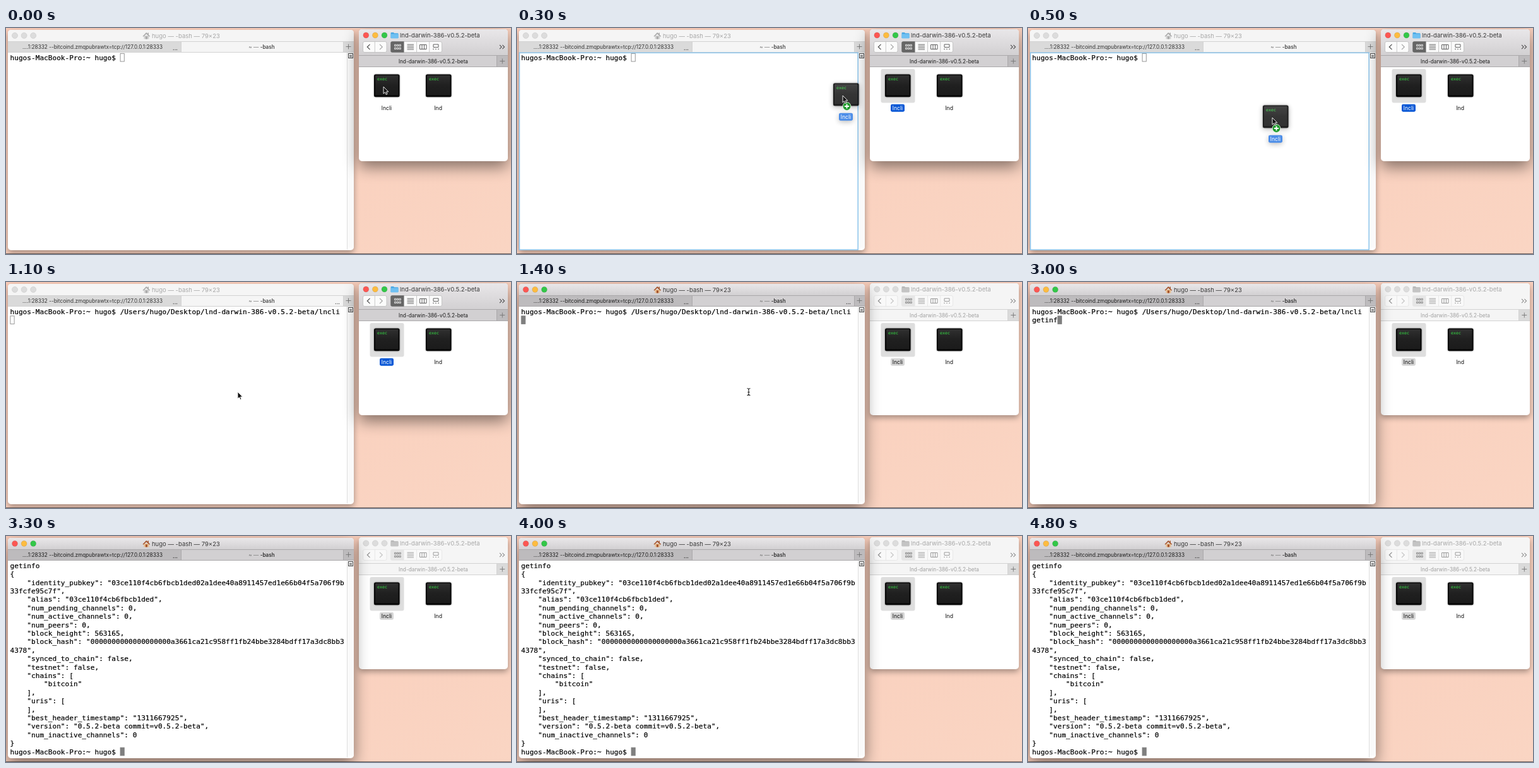
Recreate the animation shown at these times as an HTML page. Size 800 by 358 pixels, loop 5000 ms.

```html
<!DOCTYPE html>
<html lang="en">
<head>
<meta charset="utf-8">
<title>Terminal drag and drop</title>
<style>
html, body { margin: 0; width: 100%; height: 100%; overflow: hidden; background: #f9d0bd; }
svg { display: block; width: 800px; height: 358px; }
text { font-family: Inter, sans-serif; font-size: 8.25px; fill: var(--ink); white-space: pre; }
.win {
  --ink: #333; --title: #a8a8a8; --bar: #f5f5f5; --tab: #dadada; --line: #d2d2d2;
  --r: #dcdcdc; --y: #dcdcdc; --g: #dcdcdc; --ring: #cdcdcd;
  --roof: #a9a9a9; --wall: #d0d0d0; --folder: #c4c4c4; --folder2: #b8b8b8;
  --btn: #f9f9f9; --edge: #e4e4e4; --icon: #909090; --sel: #e6e6e6; --selIcon: #777;
  --pick: #d6d6d6; --pickInk: #111;
}
.win.on {
  --ink: #1c1c1c; --title: #383838; --bar: #d2d0d2; --tab: #bdbbbd; --line: #aaa8aa;
  --r: #fc5753; --y: #fdbc40; --g: #33c748; --ring: rgba(0,0,0,.14);
  --roof: #a5532b; --wall: #e5b98a; --folder: #6fc0f2; --folder2: #4ba8e4;
  --btn: #fbfbfb; --edge: #bcbcbc; --icon: #505050; --sel: #666; --selIcon: #fff;
  --pick: #0b59d6; --pickInk: #fff;
}
.frame { fill: #fff; filter: drop-shadow(0 4px 5px rgba(0,0,0,.34)); }
.on .frame { filter: drop-shadow(0 9px 12px rgba(0,0,0,.48)); }
.shade { fill: var(--bar); }
.on .shade { fill: url(#metal); }
.title { font-size: 9.5px; fill: var(--title); }
.mid { text-anchor: middle; }
.dim { fill: #777; font-weight: 400; }
#finder:not(.on) .tabname { fill: #a0a0a0; }
.name { font-size: 8.7px; fill: #111; text-anchor: middle; }
.picked { fill: var(--pickInk); }
.line { stroke: var(--line); fill: none; }
.glyph { stroke: var(--icon); fill: none; }
.btn { fill: var(--btn); stroke: var(--edge); }
#rows text, .exec { font-family: "DejaVu Sans Mono", monospace; }
#rows text { font-size: 11.13px; fill: #000; stroke: #000; stroke-width: .2; }
.exec { font-size: 6.6px; fill: #35e044; }
</style>
</head>
<body>
<svg viewBox="0 0 800 358">
  <defs>
    <linearGradient id="wall" x2="1" y2="1">
      <stop stop-color="#f9cbb8"/><stop offset="1" stop-color="#fad5c3"/>
    </linearGradient>
    <linearGradient id="metal" x2="0" y2="1">
      <stop stop-color="#e9e7e9"/><stop offset="1" stop-color="#d2d0d2"/>
    </linearGradient>
    <linearGradient id="screen" x2="0" y2="1">
      <stop stop-color="#303030"/><stop offset=".5" stop-color="#202020"/><stop offset="1" stop-color="#1b1b1b"/>
    </linearGradient>
    <g id="lights" stroke="var(--ring)" stroke-width=".7">
      <circle r="4.5" fill="var(--r)"/>
      <circle cx="14.6" r="4.5" fill="var(--y)"/>
      <circle cx="29.2" r="4.5" fill="var(--g)"/>
    </g>
    <g id="app">
      <rect x="583" y="73.5" width="40.5" height="35.7" rx="2.5" fill="#060606" style="filter:drop-shadow(0 .8px .8px rgba(0,0,0,.5))"/>
      <rect x="585" y="75" width="36.5" height="31.5" rx="1" fill="url(#screen)"/>
      <text class="exec" x="588" y="82.8">exec</text>
    </g>
    <path id="plus" d="M-4 0H4M0 -4V4" fill="none" stroke="#757575" stroke-width=".9"/>
  </defs>

  <rect width="800" height="358" fill="url(#wall)"/>
  <rect y="357" width="800" height="1" fill="#71625d"/>

  <g id="windows">
  <g id="term" class="win">
    <rect class="frame" x="3" y="3" width="548" height="349" rx="5"/>
    <path class="shade" d="M3 21V8Q3 3 8 3H546Q551 3 551 8V21Z"/>
    <path d="M3 21H277V38H3ZM534 21H551V38H534Z" fill="var(--tab)"/>
    <path d="M277 21H534V38H277Z" fill="var(--bar)"/>
    <path class="line" d="M3 21.5H551M3 38.5H551M277.5 21V38M534.5 21V38"/>
    <use href="#lights" x="14" y="12"/>
    <path d="M218.5 12H226.5V17.5H218.5Z" fill="var(--wall)"/>
    <path d="M216.5 13L222.3 7L224.5 9.2V7.6H226V10.7L228.3 13L227.2 13.8L222.3 9.4L217.5 13.8ZM221 13.5H224V17.5H221Z" fill="var(--roof)"/>
    <text class="title" x="231" y="15.6">hugo — -bash — 79×23</text>
    <text class="mid" x="137" y="33">....1:28332 --bitcoind.zmqpubrawtx=tcp://127.0.0.1:28333</text>
    <text class="mid" x="405" y="33" font-weight="500"><tspan class="dim">~ — </tspan>-bash</text>
    <text x="264" y="35" font-weight="600">...</text>
    <text id="busy" x="521" y="35" font-weight="600">...</text>
    <use href="#plus" x="542.5" y="29.5"/>
    <rect x="540" y="39" width="11" height="309" fill="#fafafa"/>
    <path d="M540.5 39V351" stroke="#dedede"/>
    <rect x="542.5" y="40.5" width="7" height="7" fill="#fff" stroke="#444"/>
    <path d="M544 43.5H548M544 45.5H548" stroke="#444"/>
    <g id="rows"></g>
    <rect id="caret" width="6.2" height="12.6" stroke-width=".9"/>
    <rect id="drop" x="3.8" y="39.3" width="536.4" height="312" fill="none" stroke="#92c7ec" stroke-width="1.6"/>
  </g>

  <g id="finder" class="win">
    <rect class="frame" x="559" y="2" width="236" height="209" rx="5"/>
    <path class="shade" d="M559 43V7Q559 2 564 2H790Q795 2 795 7V43Z"/>
    <path d="M559 43H777V61H559Z" fill="var(--bar)"/>
    <path d="M777 43H795V61H777Z" fill="var(--tab)"/>
    <path class="line" d="M559 43.5H795M559 61.5H795M777.5 44V61"/>
    <use href="#lights" x="570.3" y="11.5"/>
    <path d="M609.5 8Q609.5 7 610.5 7H614L615 8.3H620.5Q621.5 8.3 621.5 9.3V16H609.5Z" fill="var(--folder2)"/>
    <rect x="609.5" y="9.4" width="12" height="7" rx=".8" fill="var(--folder)"/>
    <text class="title" x="624" y="15">lnd-darwin-386-v0.5.2-beta</text>
    <rect class="btn" x="565.5" y="21.5" width="37.5" height="17" rx="2.5" stroke-width=".8"/>
    <path d="M584.3 21.5V38.5" stroke="var(--edge)" stroke-width=".8"/>
    <path class="glyph" d="M576.5 25.8L572.3 30L576.5 34.2" stroke-width="1.2"/>
    <path class="glyph" d="M592 25.8L596.2 30L592 34.2" stroke-width="1.2" opacity=".5"/>
    <rect class="btn" x="609.5" y="21.5" width="81" height="17" rx="2.5" stroke-width=".8"/>
    <path d="M650.5 21.5V38.5M670.7 21.5V38.5" stroke="var(--edge)" stroke-width=".8"/>
    <path d="M630.5 21.2H612Q609.3 21.2 609.3 24V36Q609.3 38.8 612 38.8H630.5Z" fill="var(--sel)"/>
    <path d="M615.5 26.3h2.4v2.4h-2.4zM619.2 26.3h2.4v2.4h-2.4zM622.9 26.3h2.4v2.4h-2.4zM615.5 31.2h2.4v2.4h-2.4zM619.2 31.2h2.4v2.4h-2.4zM622.9 31.2h2.4v2.4h-2.4z" fill="none" stroke="var(--selIcon)" stroke-width=".8"/>
    <path class="glyph" d="M635.5 26.2H646M635.5 28.8H646M635.5 31.4H646M635.5 34H646" stroke-width=".9"/>
    <path class="glyph" d="M655.5 26.5H666V33.5H655.5ZM659 26.5V33.5M662.5 26.5V33.5" stroke-width=".9"/>
    <path class="glyph" d="M677 26H685V30.5H677ZM676 33.3H678M680 33.3H682M684 33.3H686" stroke-width=".9"/>
    <path class="glyph" d="M782 26.8L785.2 30L782 33.2M786.4 26.8L789.6 30L786.4 33.2" stroke-width="1.1"/>
    <text class="mid tabname" x="677" y="56">lnd-darwin-386-v0.5.2-beta</text>
    <use href="#plus" x="786.3" y="52.5"/>
    <g id="pick">
      <rect x="576.5" y="65" width="54" height="53.5" rx="3" fill="#dedede"/>
      <rect x="592" y="120.7" width="22" height="12" rx="2.4" fill="var(--pick)"/>
    </g>
    <use href="#app"/>
    <use href="#app" x="82"/>
    <text id="cliName" class="name" x="603" y="129.8">lncli</text>
    <text class="name" x="684.7" y="129.8">lnd</text>
  </g>
  </g>

  <g id="ghost">
    <g opacity=".9" style="filter:drop-shadow(0 2px 4px rgba(0,0,0,.3))">
      <use href="#app"/>
      <rect x="592" y="120.7" width="22" height="12" rx="2.4" fill="#3a82e6"/>
      <text class="name" x="603" y="129.8" style="fill:#fff">lncli</text>
    </g>
    <g id="badge" transform="translate(604.5 110)">
      <circle r="6.4" fill="#1f9a2c" stroke="#e4f3e4" stroke-width=".9"/>
      <path d="M-3.6 0H3.6M0 -3.6V3.6" stroke="#fff" stroke-width="1.9"/>
    </g>
  </g>
  <path id="arrow" d="M0 0V11L2.6 8.7L4.2 12.4L6 11.6L4.4 8H7.8Z" fill="#111" stroke="#fff" stroke-width=".9"/>
  <path id="beam" d="M364.5 168.5Q367 168.5 367 170.5Q367 168.5 369.5 168.5M367 170V178M364.5 179.5Q367 179.5 367 177.5Q367 179.5 369.5 179.5M365.4 174.5H368.6" fill="none" stroke="#222" stroke-width="1.1"/>
</svg>
<script>
const LOOP = 5000, STEP = 100;
const COL = 6.7, ROW = 13.4, LEFT = 6.5, TOP = 40;
const $ = id => document.getElementById(id);
const show = (id, on) => $(id).style.display = on ? '' : 'none';

const PROMPT = 'hugos-MacBook-Pro:~ hugo$ ';
const PASTED = '/Users/hugo/Desktop/lnd-darwin-386-v0.5.2-beta/lncli ';
const REPLY = `getinfo
{
    "identity_pubkey": "03ce110f4cb6fbcb1ded02a1dee40a8911457ed1e66b04f5a706f9b
33fcfe95c7f",
    "alias": "03ce110f4cb6fbcb1ded",
    "num_pending_channels": 0,
    "num_active_channels": 0,
    "num_peers": 0,
    "block_height": 563165,
    "block_hash": "0000000000000000000a3661ca21c958ff1fb24bbe3284bdff17a3dc8bb3
4378",
    "synced_to_chain": false,
    "testnet": false,
    "chains": [
        "bitcoin"
    ],
    "uris": [
    ],
    "best_header_timestamp": "1311667925",
    "version": "0.5.2-beta commit=v0.5.2-beta",
    "num_inactive_channels": 0
}
${PROMPT}`.split('\n');

const PRESS = 100, RELEASE = 800, FOCUS = 1400, ENTER = 3300;
const KEYS = [2300, 2400, 2500, 2700, 2800, 2900, 3100];
// time, x, y of the pointer
const PATH = [[100, 598, 93], [200, 575, 95], [300, 516, 107], [400, 440, 125],
              [500, 387, 142], [600, 371, 166], [700, 367, 174]];

const lines = REPLY.map((_, i) => {
  const line = document.createElementNS('http://www.w3.org/2000/svg', 'text');
  line.setAttribute('x', LEFT);
  line.setAttribute('y', TOP + 10.8 + i * ROW);
  return $('rows').appendChild(line);
});

function pointer(t) {
  const i = PATH.findIndex(p => p[0] > t);
  if (i < 0) return PATH[PATH.length - 1].slice(1);
  if (i === 0) return PATH[0].slice(1);
  const [a, b] = [PATH[i - 1], PATH[i]], k = (t - a[0]) / (b[0] - a[0]);
  return [a[1] + (b[1] - a[1]) * k, a[2] + (b[2] - a[2]) * k];
}

function screenRows(t) {
  if (t >= ENTER) return REPLY;
  if (t < RELEASE) return [PROMPT];
  return [PROMPT + PASTED, 'getinfo'.slice(0, KEYS.filter(k => k <= t).length)];
}

function draw(t) {
  const focused = t >= FOCUS, typing = t >= KEYS[0];
  const rows = screenRows(t), last = rows.length - 1;
  lines.forEach((line, i) => line.textContent = rows[i] || '');
  const caret = $('caret');
  caret.setAttribute('x', LEFT + .4 + rows[last].length * COL);
  caret.setAttribute('y', TOP + .4 + last * ROW);
  caret.setAttribute('fill', focused ? '#7f7f7f' : 'none');
  caret.setAttribute('stroke', focused ? '#7f7f7f' : '#8c8c8c');

  // the focused window lies on top and casts its shadow on the other
  const front = $(focused ? 'term' : 'finder');
  if (front.nextElementSibling) $('windows').append(front);
  $('term').classList.toggle('on', focused);
  $('finder').classList.toggle('on', !focused);
  $('cliName').classList.toggle('picked', t >= PRESS);
  show('pick', t >= PRESS);
  show('busy', t >= RELEASE && !typing);

  const [x, y] = pointer(t), drag = t > PRESS && t < RELEASE, inside = drag && x < 545;
  show('ghost', drag);
  show('badge', inside);
  show('drop', inside);
  show('arrow', !focused);
  show('beam', focused && !typing);
  $('ghost').setAttribute('transform', `translate(${x - PATH[0][1]} ${y - PATH[0][2]})`);
  $('arrow').setAttribute('transform', `translate(${x} ${y})`);
}

let shown = -1;
function tick() {
  const t = Math.floor(performance.now() % LOOP / STEP) * STEP;
  if (t !== shown) draw(shown = t);
  requestAnimationFrame(tick);
}
tick();
</script>
</body>
</html>
```
